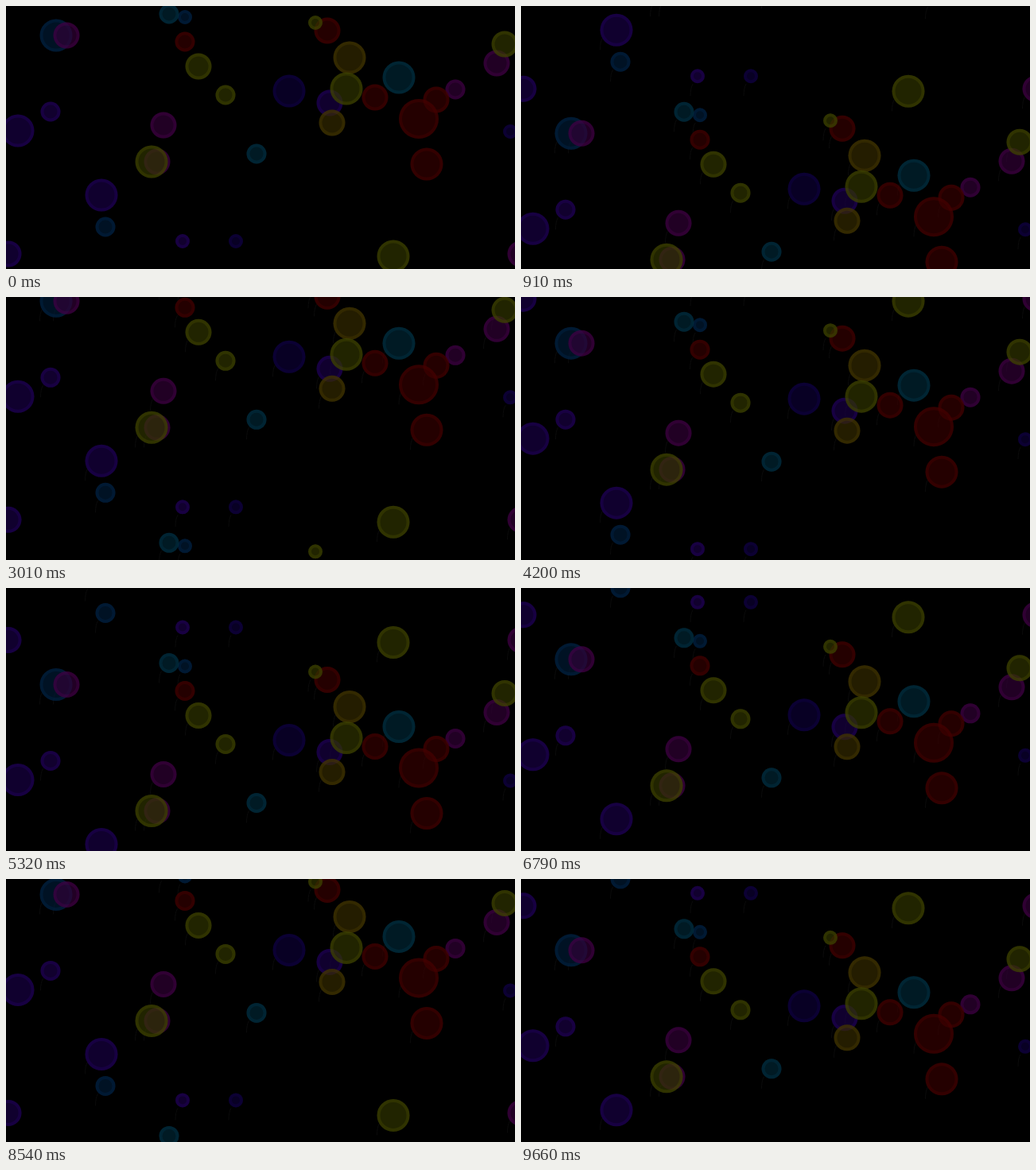
Animation, 640 px wide and 331 px high, one loop 9.73 s. Source, as an HTML page with a canvas:

```html
<!DOCTYPE html>
<html lang="en">
<head>
<meta charset="utf-8">
<title>Rising balloons</title>
<style>
  html, body { margin: 0; width: 100%; height: 100%; overflow: hidden; background: #000; }
  canvas { display: block; }
</style>
</head>
<body>
<canvas id="stage" width="640" height="331"></canvas>
<script>
const ctx = document.getElementById('stage').getContext('2d');
const HEIGHT = 331;
const LOOP = 9730;
const STEP = 70;
const UNIT = HEIGHT / 94; // smallest rise
const TOP = -5;           // balloons re-enter from below past this line

const RADIUS = { huge: 25, big: 20.5, medium: 16.5, small: 12.5, tiny: 9 };

// Back to front: starting places of the balloons by colour and size
const colours = [
  { hue: 210, big: [[63, 37]], small: [[125, 278]], tiny: [[225, 14]] },
  { hue: 254, big: [[356, 107]], tiny: [[289, 296], [634, 158]] },
  { hue: 262, light: 14, big: [[15, 157], [120, 238]], medium: [[407, 122], [3, 312]],
    small: [[56, 133]], tiny: [[222, 296]] },
  { hue: 295, medium: [[76, 37], [198, 150], [190, 196], [617, 72], [647, 312]], small: [[565, 105]] },
  { hue: 197, big: [[494, 90]], small: [[205, 10], [315, 186]] },
  { hue: 0, huge: [[519, 142]], big: [[529, 199]], medium: [[404, 31], [464, 115], [541, 118]],
    small: [[225, 45]] },
  { hue: 48, big: [[432, 65]], medium: [[410, 147]] },
  { hue: 65, big: [[183, 196], [428, 104], [487, 315]], medium: [[242, 76], [627, 48]],
    small: [[276, 112]], tiny: [[389, 21]] }
];

const balloons = colours.flatMap(({ hue, light = 11, ...sizes }) =>
  Object.entries(sizes).reverse().flatMap(([size, places]) =>
    places.map(([x, y]) => ({ hue, light, x, y, r: RADIUS[size] }))));

// The rise is slightly uneven: [step, units risen]
const pace = [[0, 0], [26, 118], [60, 276], [76, 352], [97, 455], [122, 569], [138, 643]];

function risenAt(step) {
  const i = Math.max(1, pace.findIndex(([s]) => s >= step));
  const [s0, u0] = pace[i - 1];
  const [s1, u1] = pace[i];
  return Math.round(u0 + (u1 - u0) * (step - s0) / (s1 - s0)) * UNIT;
}

const wrap = y => ((y - TOP) % HEIGHT + HEIGHT) % HEIGHT + TOP;

function drawString({ x, r }, y) {
  ctx.beginPath();
  ctx.moveTo(x - r + 3, y + 10);
  ctx.quadraticCurveTo(x - r, y + 15, x - r, y + 25);
  ctx.strokeStyle = '#0b0b0b';
  ctx.lineWidth = 1;
  ctx.stroke();
}

function drawBalloon({ hue, light, x, r }, y) {
  ctx.beginPath();
  ctx.arc(x, y, r, 0, 2 * Math.PI);
  ctx.fillStyle = `hsla(${hue}, 100%, ${light}%, .65)`;
  ctx.fill();
  ctx.beginPath();
  ctx.arc(x, y, r - 2, 0, 2 * Math.PI);
  ctx.strokeStyle = `hsla(${hue}, 100%, ${light * 1.45}%, .35)`;
  ctx.lineWidth = 4;
  ctx.stroke();
}

function draw(now) {
  const step = Math.floor(now % LOOP / STEP);
  const risen = risenAt(step);
  ctx.fillStyle = '#000';
  ctx.fillRect(0, 0, 640, HEIGHT);
  if (step > 0) {
    for (const b of balloons) {
      const y = wrap(b.y - risen);
      drawString(b, y);
      drawString(b, y - HEIGHT);
    }
  }
  for (const b of balloons) drawBalloon(b, wrap(b.y - risen));
}

const start = performance.now();
function tick() {
  draw(performance.now() - start);
  requestAnimationFrame(tick);
}
tick();
</script>
</body>
</html>
```
